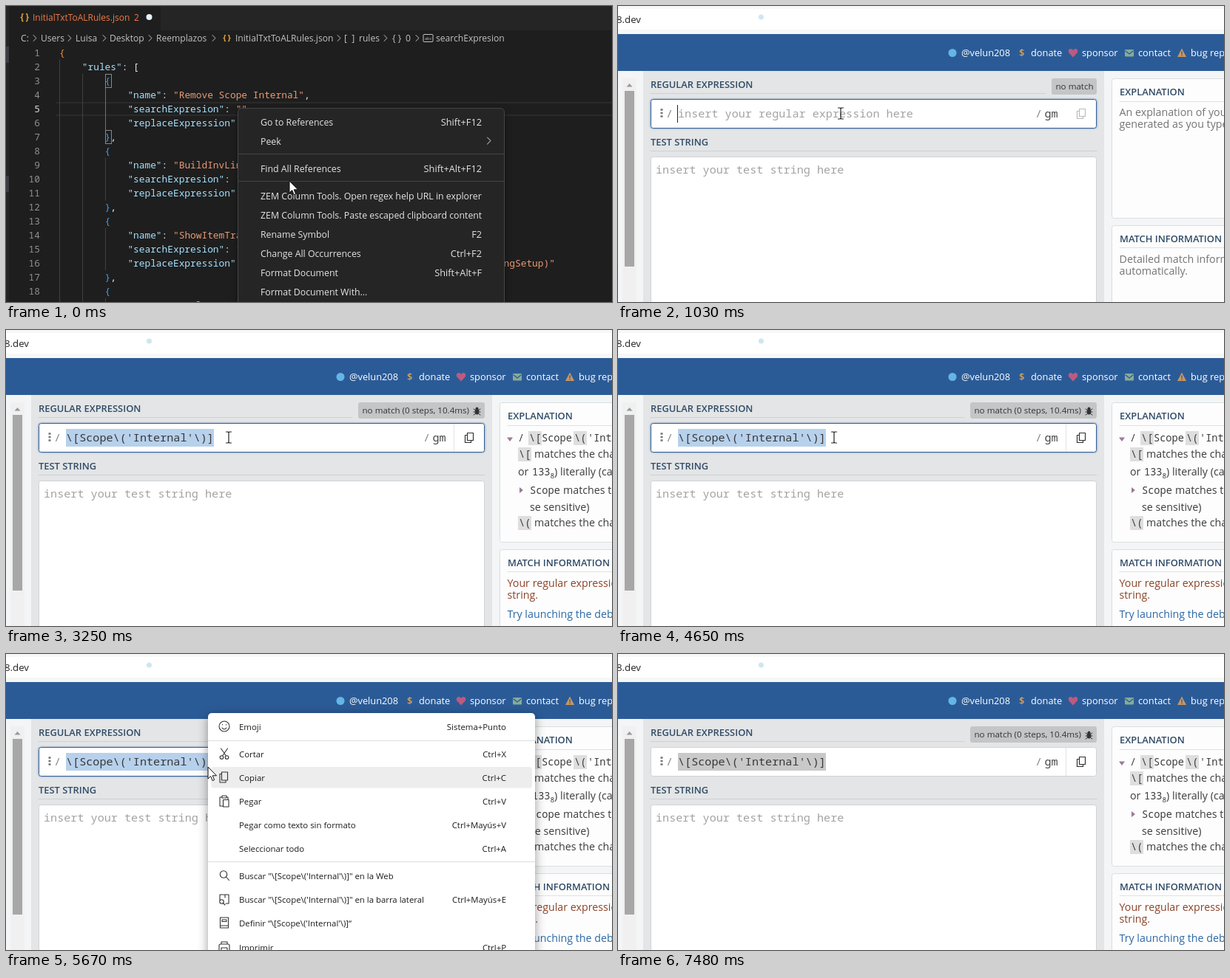
Recreate the animation shown at these times as an HTML page. Size 819x401 px, loop 8 s.

```html
<!DOCTYPE html>
<html lang="en">
<head>
<meta charset="utf-8">
<title>Regex helper</title>
<style>
html, body { margin: 0; height: 100%; overflow: hidden; background: #1e1e1e; }
svg { display: block; width: 100vw; height: 100vh; }
text { white-space: pre; font-family: "Open Sans", "Noto Sans", sans-serif; }
.mono { font-family: "Noto Sans Mono", "DejaVu Sans Mono", monospace; }
.semi { font-weight: 600; }
.end { text-anchor: end; }
.line { fill: none; stroke-linecap: round; stroke-linejoin: round; }
</style>
</head>
<body>
<svg id="stage" viewBox="0 0 819 401"></svg>
<script>
const LOOP = 8000;

const text = (x, y, s, size, fill, cls = '') =>
  `<text x="${x}" y="${y}" font-size="${size}" fill="${fill}" class="${cls}">${s}</text>`;
const rect = (x, y, w, h, fill, rest = '') =>
  `<rect x="${x}" y="${y}" width="${w}" height="${h}" fill="${fill}" ${rest}/>`;
const stroke = (d, color, width = 1) =>
  `<path class="line" d="${d}" stroke="${color}" stroke-width="${width}"/>`;
const shape = (d, fill) => `<path d="${d}" fill="${fill}"/>`;
const disc = (x, y, r, fill) => `<circle cx="${x}" cy="${y}" r="${r}" fill="${fill}"/>`;
const during = (from, to, ...parts) =>
  `<g data-from="${from}" data-to="${to}">${parts.join('')}</g>`;
const shadow = (blur, ...parts) =>
  `<g style="filter:drop-shadow(0 3px ${blur}px rgba(0,0,0,.4))">${parts.join('')}</g>`;

// ---------- code editor ----------
const CELL = 7.7, CODE = 12.83, STRING = '#e89a74';
const baseline = n => 68 + 19 * (n - 1);

function code(n, col, s, brace = '#3d9fee') {
  const spans = s.replace(/"[^"]*"(?=:)|"[^"]*"?|[{}]|[^"{}]+/g, (t, at) => {
    const key = s[at + t.length] === ':';
    const color = t[0] === '"' ? (key ? '#a6e2ff' : STRING) : /[{}]/.test(t) ? brace : '#e6e6e6';
    return `<tspan fill="${color}">${t}</tspan>`;
  });
  return text(72 + col * CELL, baseline(n), spans, CODE, '#e6e6e6', 'mono');
}

function rule(n, name, search) {
  return code(n, 8, '{') + code(n + 1, 12, `"name": "${name}`) +
    code(n + 2, 12, `"searchExpresion": "${search}`) +
    code(n + 3, 12, '"replaceExpression":') + code(n + 4, 8, '},');
}

function editor() {
  const crumb = '#c2c2c2', gold = '#e2a33c', modified = '#f07a48';
  const crumbs = [[20, 'C:'], [47, 'Users'], [94, 'Luisa'], [140, 'Desktop'], [203, 'Reemplazos'],
    [310, 'InitialTxtToALRules.json'], [457, '[  ]'], [477, 'rules'], [522, '{ }'], [540, '0'],
    [581, 'searchExpresion']];
  let s = rect(0, 0, 819, 401, '#1e1e1e') + rect(209, 0, 610, 33, '#252526') +
    rect(0, 0, 4, 401, '#252526') + rect(0, 55, 4, 22, '#3c3c40') + rect(0, 230, 4, 22, '#3c3c40') +
    text(18, 19, '{}', 12, gold, 'mono semi') +
    text(36, 20, 'InitialTxtToALRules.json', 12, modified) + text(173, 20, '2', 12, modified) +
    disc(193.5, 15, 4, '#e4f4fd') + text(292, 47, '{}', 11, gold, 'mono semi');
  for (const [x, t] of crumbs) s += text(x, 48, t, 12.1, crumb);
  for (const x of [37, 84, 131, 193, 279, 448, 511, 554])
    s += stroke(`M${x} 39.5l4 4l-4 4`, crumb);
  s += rect(564, 38.5, 13, 10, 'none', `stroke="${crumb}" rx="1"`) + text(566, 46, 'abc', 5.5, crumb);

  s += stroke('M68 131H819M68 148H819', '#2a2a2a', 2) +
    stroke('M72.5 73V401M103.5 92V401M134.5 206V263M134.5 301V358M134.5 396V401', '#404040') +
    stroke('M134.5 111V168', '#707070');
  for (let n = 1; n < 19; n++)
    s += text(46, baseline(n), n, CODE, n === 5 ? '#dcdcdc' : '#8f8f8f', 'mono end');
  for (const y of [92.5, 168.5]) s += rect(134.5, y, 8, 18, 'none', 'stroke="#888"');
  return s + code(1, 0, '{', '#f0903c') + code(2, 4, '"rules": [') +
    rule(3, 'Remove Scope Internal",', '"') + rule(8, 'BuildInvLine', '') +
    rule(13, 'ShowItemTrack', '') + text(72 + 78 * CELL, baseline(16), 'ngSetup)"', CODE, STRING, 'mono') +
    code(18, 8, '{') + code(19, 12, '"name": "Replace');
}

function editorMenu() {
  const ink = '#e4e4e4';
  const rows = [[157, 'Go to References', 'Shift+F12'], [183, 'Peek', ''],
    [220, 'Find All References', 'Shift+Alt+F12'],
    [257, 'ZEM Column Tools. Open regex help URL in explorer', ''],
    [283, 'ZEM Column Tools. Paste escaped clipboard content', ''],
    [309, 'Rename Symbol', 'F2'], [335, 'Change All Occurrences', 'Ctrl+F2'],
    [361, 'Format Document', 'Shift+Alt+F'], [387, 'Format Document With...', '']];
  let s = shadow(4, rect(313.5, 138.5, 360, 290, '#252526', 'stroke="#454545" rx="5"')) +
    stroke('M314 200.5H673M314 237.5H673', '#454545') +
    stroke('M650.5 178l4.5 4.5l-4.5 4.5', ink) +
    during(200, 1030, rect(318, 243, 351, 26, '#04395e', 'rx="4"'));
  for (const [y, label, keys] of rows)
    s += text(344, y + 4.5, label, 12.33, ink) + text(643, y + 4.5, keys, 12.75, ink, 'end');
  return s + during(630, 1030, disc(384, 249, 12, 'rgba(188,174,24,.82)'));
}

// ---------- web page ----------
const INK = '#3c3c3c', NAVY = '#2f4a66', BLUE = '#2b5b97', PATTERN = "\\[Scope\\('Internal'\\)]";
const mono = (x, y, s, size = 13.65, fill = INK) => text(x, y, s, size, fill, 'mono');
const body = (x, y, s, fill = INK) => text(x, y, s, 14.25, fill);
const heading = (x, y, s) => text(x, y, s, 12.9, NAVY, 'semi');
const caret = (x, from, to) => during(from, to, rect(x, 134, 1, 24, '#222'));

function badge(x, label) {
  return stroke(`M44 118.5H${x - 8}`, '#cdd2d5') + rect(x, 98, 647 - x, 22, '#c4c5c6', 'rx="3"') +
    text(x + 5.5, 113, label, 11.6, '#333');
}

function header() {
  const links = [[464, '@velun208'], [558, 'donate'], [627, 'sponsor'], [703, 'contact'], [774, 'bug report']];
  let s = rect(0, 0, 819, 38, '#f7f7f7') + rect(-20, 4, 860, 28, '#fff') +
    text(-2, 23, '8.dev', 13.2, '#222') + disc(193.5, 15, 3.5, '#cfe6f3') + rect(0, 38, 819, 50, BLUE);
  for (const [x, t] of links) s += text(x, 68, t, 12.8, '#fff');
  return s + disc(452, 63.5, 5.5, '#63b6e6') + text(542, 68, '$', 13, '#d9a25f', 'semi') +
    shape('M615 69.5L609 63Q608 58 612 58Q614 58 615 60Q616 58 618 58Q622 58 621 63Z', '#bd5a80') +
    rect(685, 59, 12, 9.5, '#86ac98', 'rx="1"') + stroke('M686 61l5 4l5-4', BLUE, 1.3) +
    shape('M762 57.5L768 69H756Z', '#c9975f') + rect(761.4, 61.5, 1.3, 4, BLUE) + rect(761.4, 66.3, 1.3, 1.3, BLUE);
}

function explanation() {
  const chip = (x, y, s) => rect(x - 1, y - 14, 18, 19, '#dedede') + mono(x, y, s);
  return shape('M677 145.5h8l-4 5.5z', '#9b7b96') + mono(692, 151, '/') + chip(707, 151, '\\[') +
    mono(724, 151, 'Scope') + chip(768, 151, '\\(') + mono(786, 151, "'Internal'") +
    chip(693, 173, '\\[') + body(714, 173, 'matches the character') +
    body(692, 197, 'or') + mono(711, 197, '133') + mono(735.5, 201, '8', 9.5) + body(741, 197, ') literally (case') +
    shape('M694 213v8l5-4z', '#9b7b96') + mono(708, 222, 'Scope') + body(753, 222, 'matches the') +
    body(708, 245, 'se sensitive)') + chip(693, 266, '\\(') + body(714, 266, 'matches the character');
}

function page() {
  const card = 'stroke="#dadfe2" rx="3"', hint = '#a3a3a3', grey = '#747474';
  const copyIcon = color => stroke('M623.5 139.5H631.5V149.5H623.5ZM623 142.5H620.5V152.5H628.5V150', color, 1.2);
  const field = (border, glow) =>
    rect(44, 126.5, 603, 39, '#fff', `rx="4" stroke="${BLUE}" stroke-opacity="${glow}" stroke-width="4"`) +
    rect(44.5, 126.5, 602, 39, '#fff', `rx="3" stroke="${border}"`);
  const bug = `<ellipse cx="636.5" cy="110.5" rx="2.8" ry="4" fill="#333"/>` + disc(636.5, 106.5, 2, '#333') +
    stroke('M632 107l3 2M641 107l-3 2M632 111h9M632 115l3-2M641 115l-3-2', '#333');
  const selection = color => rect(81, 134, 200, 24, color);

  return rect(0, 0, 819, 401, '#f3f5f6') + header() +
    rect(6, 98, 19, 303, '#f0f0f0') + shape('M11.5 109.5h8l-4-4.5z', '#999') + rect(9, 115, 13, 238, '#a7a7a7') +
    rect(34, 88, 623, 313, '#e3e5e6') + heading(44, 111, 'REGULAR EXPRESSION') +
    during(1030, 1830, badge(586, 'no match')) + during(1830, 2450, badge(560, 'processing...')) +
    during(2450, LOOP, badge(476, 'no match (0 steps, 10.4ms)'), bug) +
    during(1030, 7280, field(BLUE, .16)) + during(7280, 7480, field('#8fa5bf', .08)) +
    during(7480, LOOP, field('#cfd4d8', 0)) +
    [140.5, 145, 149.5].map(y => rect(57.5, y - 1.3, 3, 2.6, '#777')).join('') +
    mono(65, 151, '/', 15.15, '#888') + mono(564, 151, '/', 15.15, '#888') + mono(576.5, 151, 'gm', 15.15, '#444') +
    during(1030, 1830, mono(81, 151, 'insert your regular expression here', 15.15, hint)) +
    during(3250, 7280, selection('#b7d1ec')) + during(7280, LOOP, selection('#c9c9c9')) +
    during(1830, LOOP, mono(81, 151, PATTERN, 15.15, '#383838')) +
    during(5080, 5470, rect(272.5, 135, 9, 22, 'none', 'stroke="#66809d" stroke-width="2"')) +
    caret(80, 1030, 1230) + caret(281, 1830, 2250) + caret(281, 2850, 3250) +
    during(1030, 2250, copyIcon('#bbb')) +
    during(2250, LOOP, copyIcon('#333'), rect(605, 127, 1, 38, '#dde1e4')) +
    heading(44, 189, 'TEST STRING') + stroke('M44 196.5H647', '#cdd2d5') +
    rect(44.5, 204.5, 602, 220, '#fff', 'rx="3" stroke="#cfd4d8"') +
    mono(51, 227, 'insert your test string here', 15.15, hint) +
    rect(667.5, 98.5, 190, 189, '#fdfdfd', card) + rect(667.5, 297.5, 190, 140, '#fdfdfd', card) +
    heading(678, 121, 'EXPLANATION') + heading(678, 320, 'MATCH INFORMATION') +
    stroke('M678 129.5H819M678 327.5H819', '#dde1e4') +
    during(1030, 2250, body(677.5, 149, 'An explanation of your regex', grey), body(677.5, 164.5, 'generated as you type.', grey),
      body(677.5, 348, 'Detailed match information', grey), body(677.5, 364, 'automatically.', grey)) +
    during(2250, LOOP, explanation(), body(677.5, 348, 'Your regular expression', '#8a4328'),
      body(677.5, 364, 'string.', '#8a4328'), body(677.5, 390, 'Try launching the debugger', '#2b68a6'));
}

function tooltip() {
  const w = '#fff';
  return shadow(6, rect(99, 66, 348.5, 63, '#212121', 'rx="4"'), shape('M267 129h12l-6 6z', '#212121')) +
    text(111, 88, 'Text', 14, w, 'semi') + body(145, 88, '— matches the character', w) + mono(318, 88, ']', 13.65, w) +
    body(330, 88, 'with index', w) + mono(404, 88, '93', 13.65, w) + mono(421, 92, '10', 10.5, w) +
    body(110, 111, '(', w) + mono(116, 111, '5D', 13.65, w) + mono(133, 115, '16', 10.5, w) + body(150, 111, 'or', w) +
    mono(168, 111, '135', 13.65, w) + mono(193, 115, '8', 10.5, w) + body(199, 111, ') literally (case sensitive)', w);
}

function browserMenu() {
  const rows = [[98, 'Emoji', 'Sistema+Punto'], [135, 'Cortar', 'Ctrl+X'], [167, 'Copiar', 'Ctrl+C'],
    [199, 'Pegar', 'Ctrl+V'], [231, 'Pegar como texto sin formato', 'Ctrl+Mayús+V'],
    [263, 'Seleccionar todo', 'Ctrl+A'], [300, `Buscar "${PATTERN}" en la Web`, ''],
    [332, `Buscar "${PATTERN}" en la barra lateral`, 'Ctrl+Mayús+E'],
    [364, `Definir “${PATTERN}“`, ''], [397, 'Imprimir', 'Ctrl+P']];
  const ring = (x, y, r) => `M${x - r} ${y}a${r} ${r} 0 1 0 ${2 * r} 0a${r} ${r} 0 1 0 ${-2 * r} 0`;
  const icons = [
    ring(295, 98, 7), 'M292 100q3 4 6 0M292.5 95.5v.5M297.5 95.5v.5',
    ring(291.5, 140, 2.3), ring(298.5, 140, 2.3), 'M290.5 128l7 10M299.5 128l-7 10',
    'M291.5 160h8v11h-8zM291 162.5h-2v11.5h8v-2.5',
    'M292 194h-3v12h4M298 194h2v3M292 192h6v3h-6zM293.5 197.5h7.5v9.5h-7.5z',
    ring(294, 298.5, 4.7), 'M297.5 302l4 4.5',
    'M289 334v-8h12v12h-4M296 326v4', ring(291.5, 335.5, 2.7), 'M293.5 337.5l2.5 2.5',
    'M289.5 357h11v14h-11zM289.5 368h11M292 360h6v2.5h-6z',
    'M291 393v-3h8v3M288 401v-6q0-2 2-2h10q2 0 2 2v6M291 402v-4h8v4'];
  let s = shadow(7, rect(273, 80, 442, 350, '#fff', 'rx="5"')) + rect(277, 153, 434, 28.5, '#ededed', 'rx="4"') +
    stroke('M273 117.5H715M273 281.5H715', '#dcdcdc') + stroke(icons.join(''), '#333', 1.1);
  for (const [y, label, keys] of rows)
    s += text(315, y + 4.5, label, 11.4, '#1c1c1c') + text(676, y + 4.5, keys, 11.4, '#1c1c1c', 'end');
  return s;
}

// ---------- pointer ----------
const pointers = {
  arrow: '<path d="M0 0V16L3.7 12.6L6.2 18.6L8.6 17.6L6.2 11.8H11.5Z" fill="#fff" stroke="#111"/>',
  hand: '<path d="M-2.2 11V1.5a1.8 1.8 0 0 1 3.6 0V8a1.6 1.6 0 0 1 3 .5a1.6 1.6 0 0 1 3 .8a1.5 1.5 0 0 1 2.6 1V15' +
    'c0 3-1.5 4-2 7H-.5c-1-3-3-5-5.5-8.5c-1-2 1.5-3 3.8-.5z" fill="#fff" stroke="#222"/>',
  beam: stroke('M-3.5-7.5h2.5l1 1l1-1h2.5M0-6.5V6.5M-3.5 7.5h2.5l1-1l1 1h2.5', '#222', 1.2),
  none: ''
};
const moves = [[0, 'arrow', 383, 237], [200, 'hand', 385, 248], [420, 'hand', 385, 250.5],
  [1030, 'beam', 301, 145.5], [4650, 'beam', 292, 145.5], [4860, 'beam', 289, 153], [5080, 'beam', 277, 153.5],
  [5270, 'beam', 275, 153.5], [5470, 'arrow', 273, 153], [6070, 'arrow', 279, 152], [6270, 'arrow', 300, 152],
  [6480, 'arrow', 331, 163], [6680, 'arrow', 333, 172], [7280, 'none', 0, 0]];

const stage = document.getElementById('stage');
stage.innerHTML = during(0, 1030, editor(), editorMenu()) + during(1030, LOOP, page()) +
  during(5270, 5470, tooltip()) + during(5670, 7080, browserMenu()) + '<g id="pointer"></g>';
const pointer = document.getElementById('pointer');
const timed = [...stage.querySelectorAll('[data-from]')];
let current;

function draw() {
  const t = performance.now() % LOOP;
  for (const g of timed)
    g.style.display = t >= +g.dataset.from && t < +g.dataset.to ? '' : 'none';
  const move = moves.findLast(m => m[0] <= t);
  if (move !== current) {
    current = move;
    pointer.innerHTML = pointers[move[1]];
    pointer.setAttribute('transform', `translate(${move[2]} ${move[3]})`);
  }
  requestAnimationFrame(draw);
}
draw();
</script>
</body>
</html>
```
